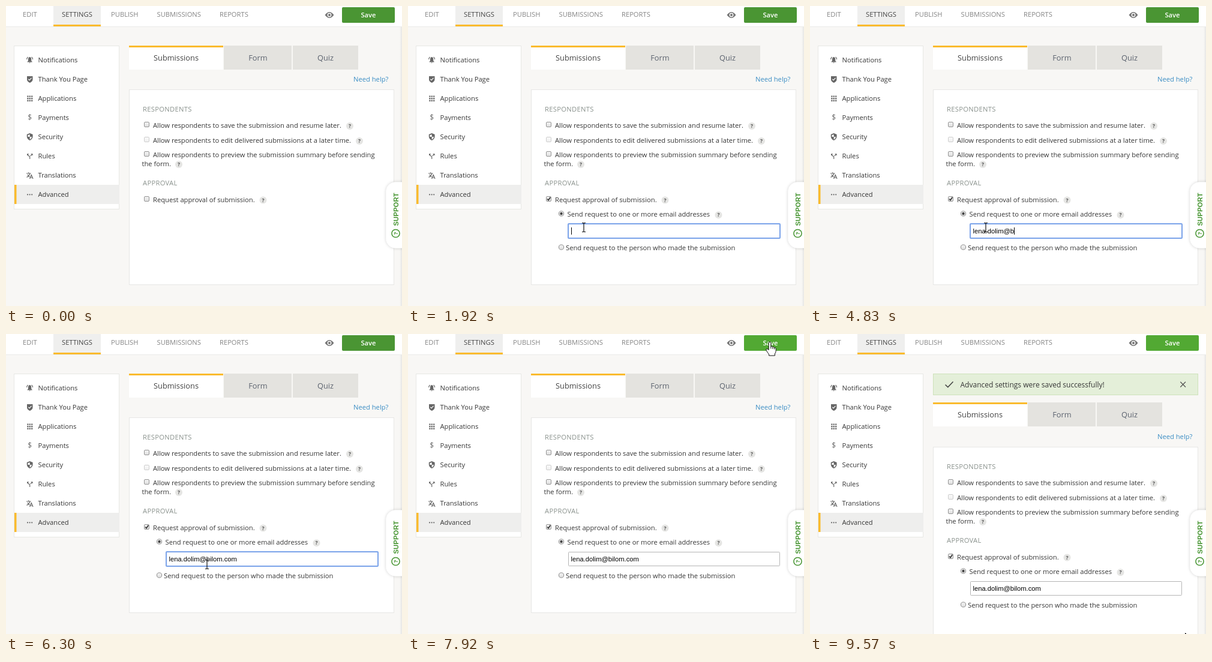
An HTML page for the animation above (9660 ms loop, 660x500 px).

```html
<!DOCTYPE html>
<html lang="en">
<head>
<meta charset="utf-8">
<title>Form approval settings</title>
<style>
html, body { margin: 0; width: 100%; height: 100%; overflow: hidden; background: #f8f7f5; }
svg { display: block; }
text { font: 11.2px "Open Sans", sans-serif; fill: #363636; white-space: pre; }
.nav text { fill: #858585; }
.nav .on { fill: #444; }
.tabs text { font-size: 12.8px; text-anchor: middle; fill: #5d6470; }
.tabs .on { fill: #444; }
.head { fill: #89918c; letter-spacing: .3px; }
.arial { font: 11.2px "Liberation Sans", Arial, sans-serif; fill: #000; }
.hint { fill: #a2a2a2; stroke: #a2a2a2; stroke-width: .3px; }
.link { fill: #3b8dc4; }
.btn { font-weight: 600; fill: #fff; text-anchor: middle; }
.note { font-size: 12px; }
.mark { font: bold 8.5px "Open Sans", sans-serif; text-anchor: middle; fill: #555; }
.support { font: bold 11.2px "Liberation Sans", Arial, sans-serif; fill: #459430; letter-spacing: .15px; }
.ico { fill: #666; stroke: none; }
.line { fill: none; stroke: #666; stroke-width: 1.2; }
.card { fill: #fff; stroke: #e7e7e5; }
.off { opacity: .45; }
</style>
</head>
<body>
<svg width="660" height="500" viewBox="0 0 660 500">
  <defs>
    <linearGradient id="edge"><stop offset="0" stop-color="#f8f7f5"/><stop offset="1" stop-color="#e6e6e4"/></linearGradient>
    <linearGradient id="boxFill" x2="0" y2="1"><stop offset="0" stop-color="#f4f4f4"/><stop offset="1" stop-color="#dedede"/></linearGradient>
    <filter id="soft" x="-50%" y="-20%" width="200%" height="140%"><feDropShadow dx="0" dy="0" stdDeviation="2.5" flood-opacity=".2"/></filter>
    <rect id="box" x=".5" y=".5" width="8" height="8" rx="1.5" fill="url(#boxFill)" stroke="#959595"/>
    <circle id="radio" r="4.1" fill="url(#boxFill)" stroke="#8d8d8d"/>
    <g id="help"><circle r="6" fill="#e5e5e3"/><text class="mark" y="3.1">?</text></g>
  </defs>

  <rect width="660" height="500" fill="#f8f7f5"/>
  <rect x="656" y="35" width="4" height="465" fill="url(#edge)"/>

  <g class="nav">
    <rect width="660" height="34" fill="#fff"/>
    <path d="M0 34.5H660" stroke="#ebebe9"/>
    <rect x="79" width="79" height="34" fill="#efefee"/>
    <rect x="79" y="31" width="79" height="3" fill="#fabb2e"/>
    <text x="28" y="18">EDIT</text>
    <text x="93" y="18" class="on">SETTINGS</text>
    <text x="175" y="18">PUBLISH</text>
    <text x="251.5" y="18">SUBMISSIONS</text>
    <text x="356" y="18">REPORTS</text>
    <path d="M531.5 15Q539 5 546.5 15Q539 25 531.5 15Z" fill="#777"/>
    <circle cx="539" cy="15" r="3.4" fill="#fff"/>
    <circle cx="539" cy="15" r="2.1" fill="#777"/>
  </g>
  <rect id="save" x="560" y="2" width="88" height="26" rx="2"/>
  <text id="saveText" class="btn" x="604" y="19">Save</text>

  <rect class="card" x="13.5" y="66.5" width="175" height="272"/>
  <rect x="14" y="298" width="175" height="32" fill="#eeeeed"/>
  <rect x="14" y="298" width="3.5" height="32" fill="#fabb2e"/>
  <g id="menu"></g>
  <g class="ico">
    <path d="M35.5 93L37 91.3V88.5Q37 85.8 39 85.2Q39.5 84.2 40.2 85.2Q42.2 85.8 42.2 88.5V91.3L43.7 93V93.6H35.5ZM38.4 94.3H40.8Q39.6 96.4 38.4 94.3Z"/>
    <path class="line" d="M34.6 89Q34.7 86.4 36.6 85M44.6 89Q44.5 86.4 42.6 85"/>
    <path d="M35 117H44.5V123Q44 126 39.7 128Q35.5 126 35 123Z"/>
    <path d="M37.2 121.8L39 123.6L42.5 119.9" fill="none" stroke="#fff" stroke-width="1.2"/>
    <path d="M36.4 149.5V159M39.8 149.5V159M43.2 149.5V159" stroke="#666" stroke-width="2.3" stroke-dasharray="2.3 1.3"/>
    <text x="36.3" y="190.3" style="font-size:12px;fill:#666">$</text>
    <path d="M39.7 212L44.6 214V218Q44 222 39.7 224Q35.4 222 34.8 218V214Z"/>
    <path d="M39.7 214V218H43.1Q42.6 221 39.7 222.4V218H36.4V215.2Z" fill="#fff"/>
    <path class="line" d="M39.7 255V251.5L35.8 247.5M40.6 250.2L43.8 247"/>
    <path d="M35 246.2H38.4L35 249.6ZM41.2 246.2H44.6V249.6Z"/>
    <path class="line" d="M34 279H41.5M37.7 277.3V279M40 279Q39 283 34.5 285.5M36 281Q37 283.5 39.5 285M39.5 288L42.3 281.5L45 288M40.6 286H44"/>
    <circle cx="36" cy="314.3" r="1.1"/><circle cx="39.6" cy="314.3" r="1.1"/><circle cx="43.2" cy="314.3" r="1.1"/>
  </g>

  <g id="banner">
    <rect x="205.5" y="66.5" width="441" height="35" fill="#e4efd9" stroke="#cee2ba"/>
    <path d="M225.5 84.5L229.8 88.6L238.5 79.6" fill="none" stroke="#444" stroke-width="1.5"/>
    <text class="note" x="250.5" y="88.8">Advanced settings were saved successfully!</text>
    <path d="M617.3 79.8L626 88.5M626 79.8L617.3 88.5" stroke="#555" stroke-width="1.3"/>
  </g>

  <g id="tabs" class="tabs">
    <rect x="205" y="66" width="157" height="40" fill="#fff"/>
    <rect x="205" y="66" width="157" height="3" fill="#fabb2e"/>
    <rect x="363" y="66" width="113" height="40" fill="#e4e3df"/>
    <rect id="quiz" x="478" y="66" width="109" height="40"/>
    <text x="283.5" y="91" class="on">Submissions</text>
    <text x="420" y="91">Form</text>
    <text x="532.5" y="91">Quiz</text>
  </g>

  <g id="page">
    <text class="link" x="579" y="126">Need help?</text>
    <rect class="card" x="205.5" y="139.5" width="441" height="325"/>
    <text class="head" x="228" y="176">RESPONDENTS</text>
    <use href="#box" x="230" y="193"/>
    <text x="245" y="203">Allow respondents to save the submission and resume later.</text>
    <use href="#help" x="573" y="200"/>
    <use href="#box" x="230" y="218" class="off"/>
    <text x="245" y="228">Allow respondents to edit delivered submissions at a later time.</text>
    <use href="#help" x="589" y="225"/>
    <use href="#box" x="230" y="242"/>
    <text x="245" y="252">Allow respondents to preview the submission summary before sending</text>
    <text x="226.5" y="267">the form.</text>
    <use href="#help" x="288" y="264"/>
    <text class="head" x="228" y="299">APPROVAL</text>
    <use href="#box" x="230" y="317"/>
    <path id="tick" d="M232 321.5L234 323.7L237.3 318.8" fill="none" stroke="#333" stroke-width="1.7"/>
    <text x="245" y="327">Request approval of submission.</text>
    <use href="#help" x="428.5" y="323.5"/>
    <g id="options">
      <use href="#radio" x="255.5" y="346"/>
      <circle cx="255.5" cy="346" r="2.2" fill="#444"/>
      <text x="265.5" y="351">Send request to one or more email addresses</text>
      <use href="#help" x="517.5" y="348.3"/>
      <rect id="field" x="267.5" y="363.5" width="352" height="23" rx="1" fill="#fff" stroke="#b5b5b5"/>
      <rect id="ring" x="267" y="363" width="353" height="24" rx="1" fill="none" stroke="#7ba3e9" stroke-width="2"/>
      <text id="hint" class="arial hint" x="271.5" y="379">Email address(es) to which the submission will be sent for approval.</text>
      <text id="mail" class="arial" x="271.5" y="379"></text>
      <rect id="caret" y="369" width="1" height="12"/>
      <use href="#radio" x="255.5" y="402"/>
      <text x="263" y="407">Send request to the person who made the submission</text>
    </g>
  </g>

  <rect x="633.5" y="293.5" width="60" height="110" rx="16" fill="#fff" filter="url(#soft)"/>
  <text class="support" transform="translate(654 366.5) rotate(-90)">SUPPORT</text>
  <circle cx="649.5" cy="379" r="6.6" fill="none" stroke="#459430" stroke-width="1.5"/>
  <text class="mark" style="fill:#459430;font-size:9.5px" transform="translate(653 379) rotate(-90)">?</text>

  <g id="cursor">
    <path id="arrow" d="M.5 .5V16.5L4.2 13L6.8 19.2L9.4 18.1L6.8 12.1H11.8Z" fill="#fff" stroke="#000"/>
    <path id="beam" d="M-3-7.5H-1L0-6.7L1-7.5H3M0-6.7V6.7M-3 7.5H-1L0 6.7L1 7.5H3" fill="none" stroke="#111" stroke-width="1.2"/>
    <path id="hand" d="M-1.8 13.5V1.9Q-1.8 .4 0 .4Q1.8 .4 1.8 1.9V8Q3.8 6.8 4.9 8.6Q6.8 7.8 7.6 9.7Q10 9.2 10.2 11.6V15.5Q10 18 8.4 20V23H-1.4V20.8Q-3.5 18.3-5.5 15Q-7 12.8-5.5 11.9Q-4 11.2-1.8 13.5M1.8 8V11.5M4.9 8.6V12M7.6 9.7V12.5" fill="#fff" stroke="#111" stroke-linejoin="round"/>
  </g>
</svg>
<script>
const LOOP = 9660;
const MAIL = "lena.dolim@bilom.com";
const $ = id => document.getElementById(id);
const show = (id, on) => { $(id).style.visibility = on ? "visible" : "hidden"; };
const within = (t, a, b) => t >= a && t < b;

$("menu").innerHTML = ["Notifications", "Thank You Page", "Applications", "Payments",
  "Security", "Rules", "Translations", "Advanced"]
  .map((s, i) => `<text x="53.5" y="${94 + 32 * i}">${s}</text>`).join("");

// time, x, y of the pointer's hot spot
const route = [
  [70, 228, 326], [300, 234, 321], [750, 234, 321], [1050, 239, 330], [1129, 239, 330],
  [1130, 261, 350], [1220, 261, 350], [1450, 288, 372], [1750, 293, 369], [6070, 293, 369],
  [6300, 335, 384], [6360, 335, 384], [6680, 375, 414], [7090, 389, 420], [7150, 392, 422],
  [7380, 555, 76], [7460, 555, 76], [7700, 603, 13], [8300, 603, 13],
  [8810, 561, 361], [9040, 561, 361], [9270, 579, 401], [9340, 586, 416], [9570, 625, 498]
];

// bursts of typing: first key, last key, number of keys
const bursts = [[2240, 2790, 4], [3270, 4050, 6], [4440, 4440, 1], [4830, 5840, 9]];

function pointAt(t) {
  const i = route.findIndex(p => p[0] > t);
  if (i < 0) return route[route.length - 1].slice(1);
  if (i === 0) return route[0].slice(1);
  const [t0, x0, y0] = route[i - 1], [t1, x1, y1] = route[i];
  const k = (t - t0) / (t1 - t0);
  return [Math.round(x0 + (x1 - x0) * k), Math.round(y0 + (y1 - y0) * k)];
}

function typedAt(t) {
  return bursts.reduce((sum, [a, b, n]) => {
    if (t < a) return sum;
    if (t >= b) return sum + n;
    return sum + 1 + Math.floor((t - a) / (b - a) * (n - 1));
  }, 0);
}

function pointerKind(t) {
  if (within(t, 1350, 6420)) return "beam";
  return within(t, 7320, 9040) ? "hand" : "arrow";
}

function draw(t) {
  const saved = t >= 9040, saving = within(t, 8260, 9040);
  const focus = within(t, 1600, 7000);

  $("tick").style.display = t >= 400 ? "" : "none";
  $("options").style.display = t >= 400 ? "" : "none";
  $("options").style.opacity = Math.min(1, (t - 400) / 250);

  const n = typedAt(t);
  $("mail").textContent = MAIL.slice(0, n);
  $("hint").style.display = t < 1600 ? "" : "none";
  $("ring").style.display = focus ? "" : "none";
  $("caret").style.display = focus && t < 6070 ? "" : "none";
  $("caret").setAttribute("x", Math.round(271.5 + (n ? $("mail").getComputedTextLength() : 0)));

  $("quiz").setAttribute("fill", within(t, 7340, 7500) ? "#ebebea" : "#e4e3df");
  $("save").setAttribute("fill", saving ? "#85c572" : t >= 7600 ? "#52a933" : "#4a9533");
  $("saveText").textContent = saving ? "Saving..." : "Save";

  show("banner", saved);
  $("tabs").setAttribute("transform", `translate(0 ${saved ? 48 : 0})`);
  $("page").setAttribute("transform", `translate(0 ${saved ? 49 : 0})`);

  const kind = pointerKind(t);
  for (const k of ["arrow", "beam", "hand"]) show(k, t >= 70 && k === kind);
  $("cursor").setAttribute("transform", `translate(${pointAt(t).join(" ")})`);
}

const start = performance.now();
function tick() {
  draw(Math.max(0, performance.now() - start) % LOOP);
  requestAnimationFrame(tick);
}
tick();
</script>
</body>
</html>
```
